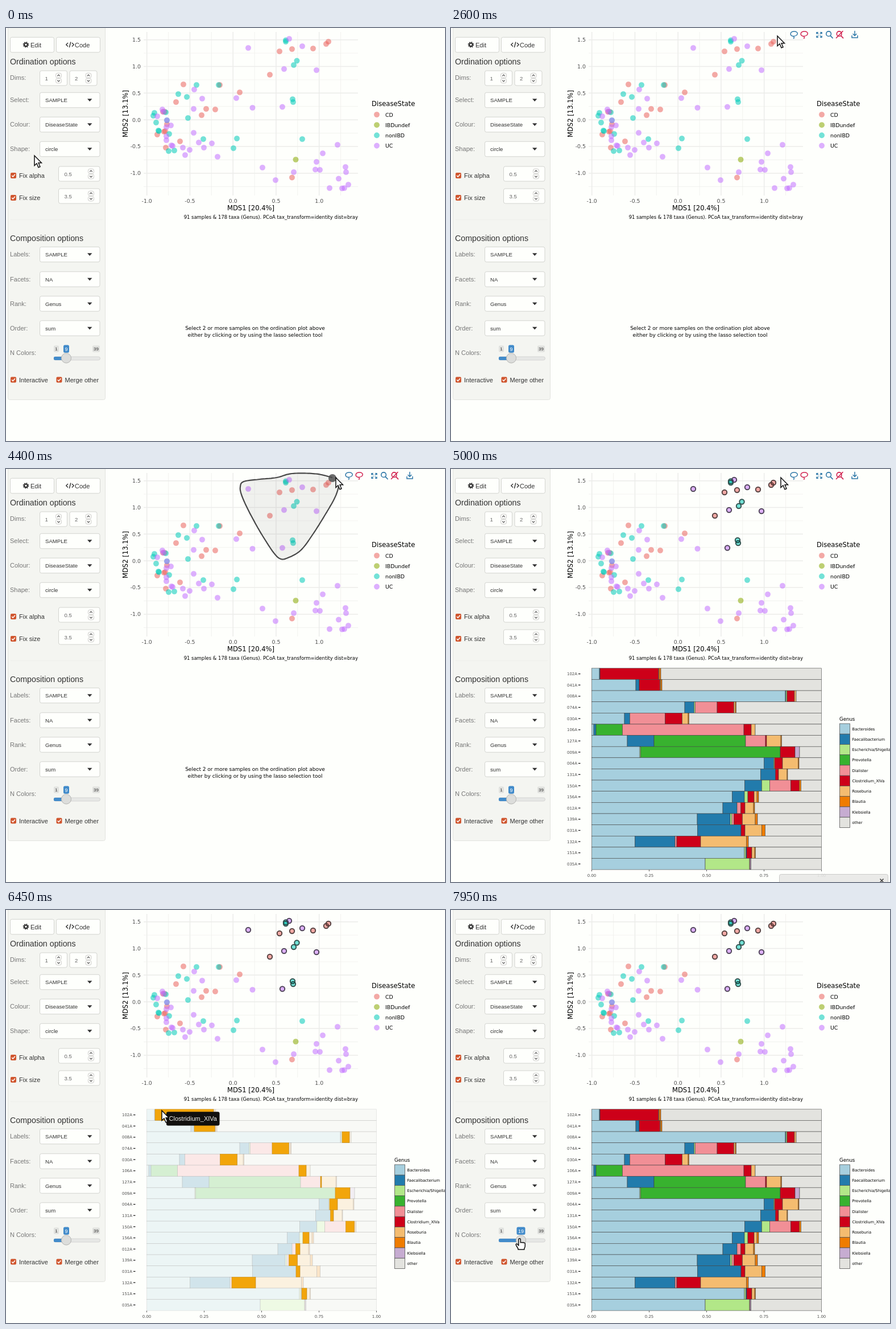
Write an HTML page that moves like this. It is 772x725 px and loops after 8000 ms.

```html
<!DOCTYPE html>
<html lang="en">
<head>
<meta charset="utf-8">
<title>Ordination explorer</title>
<style>
html, body { margin: 0; width: 100%; height: 100%; overflow: hidden; background: #fefffc; }
svg { display: block; width: 100%; height: 100%; }
.ui { font-family: "Liberation Sans", Arial, sans-serif; }
.plot { font-family: "DejaVu Sans", Verdana, sans-serif; }
</style>
</head>
<body>
<script>
const NS = "http://www.w3.org/2000/svg";

function el(tag, attrs, parent, text) {
  const node = document.createElementNS(NS, tag);
  set(node, attrs);
  if (text !== undefined) node.textContent = text;
  if (parent) parent.appendChild(node);
  return node;
}
function set(node, attrs) {
  for (const k in attrs) node.setAttribute(k, attrs[k]);
}
function show(node, on) {
  node.setAttribute("visibility", on ? "visible" : "hidden");
}
const group = (parent, attrs = {}) => el("g", attrs, parent);
const label = (p, x, y, size, fill, str, anchor = "start") =>
  el("text", { x, y, "font-size": size, fill, "text-anchor": anchor }, p, str);
const rect = (p, x, y, width, height, fill, extra) =>
  el("rect", { x, y, width, height, fill, ...extra }, p);
const line = (p, d, stroke, width, extra) =>
  el("path", { d, stroke, fill: "none", "stroke-width": width, ...extra }, p);

const svg = el("svg", { viewBox: "0 0 772 725" }, document.body);

// ---------- sidebar ----------
const side = group(svg, { class: "ui" });
const INK = "#333", MUTED = "#777", SMALL = 9.6, BODY = 11.05;
rect(side, 3.5, -6, 171, 658.5, "#f4f5f1", { rx: 3, stroke: "#e2e3df" });

function field(x, y, w, h = 26.5) {
  rect(side, x, y - h / 2, w, h, "#fefffc", { rx: 3, stroke: "#d3d4d0" });
}
function numberField(x, y, w, value, spin, pad) {
  field(x, y, w, 26);
  label(side, x + pad, y + 3.5, SMALL, "#666", value);
  for (const s of [-1, 1]) {
    const cy = y + s * 4.6;
    rect(side, spin - 5, cy - 4.2, 10, 8.4, "#fafaf8", { rx: 3, stroke: "#c4c4c2", "stroke-width": .8 });
    line(side, `M${spin - 2.2} ${cy - s}l2.2 ${s * 2.2}l2.2 ${-s * 2.2}`, "#555", 1.2);
  }
}
function selectRow(name, y, value) {
  label(side, 7, y + 3.5, BODY, MUTED, name);
  field(59.5, y, 105.5);
  label(side, 69, y + 3.5, SMALL, INK, value);
  el("path", { d: `M143 ${y - 2.2}h8.4l-4.2 4.6z`, fill: INK }, side);
}
function checkbox(x, y, name) {
  rect(side, x - 5, y - 5, 10, 10, "#d0562f", { rx: 2 });
  line(side, `M${x - 2.8} ${y}l2 2.2l3.8 -4.4`, "#fff", 1.5);
  label(side, x + 10, y + 4, BODY, INK, name);
}

field(7.5, 29.5, 77);
field(88.5, 29.5, 77);
label(side, 43, 33.5, BODY, INK, "Edit");
label(side, 121, 33.5, BODY, INK, "Code");
el("circle", { cx: 35, cy: 29.3, r: 2.8, fill: "none", stroke: INK, "stroke-width": 2.2 }, side);
el("circle", { cx: 35, cy: 29.3, r: 4.4, fill: "none", stroke: INK, "stroke-width": 1.8, "stroke-dasharray": "1.73 1.73" }, side);
line(side, "M109 26l-3.2 3.3l3.2 3.3M116 26l3.2 3.3l-3.2 3.3M113.8 24.5l-2.4 9.6", INK, 1.4);

label(side, 7, 63.5, 14.25, INK, "Ordination options");
label(side, 7, 90.5, BODY, MUTED, "Dims:");
numberField(59.5, 88, 48, "1", 92.5, 9);
numberField(112, 88, 48, "2", 145, 9);
selectRow("Select:", 126.5, "SAMPLE");
selectRow("Colour:", 169.5, "DiseaseState");
selectRow("Shape:", 212.5, "circle");
checkbox(13, 259, "Fix alpha");
numberField(92.5, 256, 72.5, "0.5", 149.5, 10);
checkbox(13, 298, "Fix size");
numberField(92.5, 295, 72.5, "3.5", 149.5, 10);
line(side, "M8 336.5H170", "#eeefeb", 1);

label(side, 7, 374, 14.25, INK, "Composition options");
selectRow("Labels:", 397.5, "SAMPLE");
selectRow("Facets:", 441, "NA");
selectRow("Rank:", 484, "Genus");
selectRow("Order:", 527, "sum");
label(side, 7, 574, BODY, MUTED, "N Colors:");
rect(side, 84, 557.5, 9, 11.5, "#e0e1de", { rx: 2 });
label(side, 88.5, 566, 8, INK, "1", "middle");
rect(side, 152, 557.5, 13, 11.5, "#e0e1de", { rx: 2 });
label(side, 158.5, 566, 8, INK, "39", "middle");
rect(side, 84, 577, 81.5, 6, "#e6e7e5", { rx: 3, stroke: "#cfcfcd", "stroke-width": .8 });
const sliderFill = rect(side, 84, 577, 22, 6, "#428bca", { rx: 2 });
const knob = el("circle", { cy: 579.5, r: 8.6, fill: "#dcdddb", stroke: "#b4b4b2", "stroke-width": 1 }, side);
const valueTag = rect(side, 0, 556.5, 10, 13.5, "#428bca", { rx: 2.5 });
const valueText = label(side, 0, 566.5, 9, "#fff", "9", "middle");
checkbox(13, 617.5, "Interactive");
checkbox(93.5, 617.5, "Merge other");

// ---------- ordination plot ----------
const plot = group(svg, { class: "plot" });
const AXIS = "#4d4d4d";
const px = v => 399.2 + v * 151.5;
const py = v => 161.2 - v * 93.7;
for (let v = -1; v <= 1.25; v += .25)
  line(plot, `M${px(v)} 7V294`, "#ececea", v * 2 % 1 ? .7 : 1.5);
for (let v = -1.25; v <= 1.5; v += .25)
  line(plot, `M242 ${py(v)}H619`, "#ececea", v * 2 % 1 ? .7 : 1.5);
for (let v = -1; v <= 1; v += .5) label(plot, px(v), 306.5, 9.4, AXIS, v.toFixed(1), "middle");
for (let v = -1; v <= 1.5; v += .5) label(plot, 237, py(v) + 3.4, 9.4, AXIS, v.toFixed(1), "end");
label(plot, 430.5, 320, 11.6, "#000", "MDS1 [20.4%]", "middle");
set(label(plot, 0, 0, 11.6, "#000", "MDS2 [13.1%]", "middle"), { transform: "translate(213.5 150.5) rotate(-90)" });
label(plot, 619, 334.5, 8.45, "#000", "91 samples & 178 taxa (Genus). PCoA tax_transform=identity dist=bray", "end");

const STATES = [
  ["CD", "#e9625c", [[312,99],[299,130],[352,142],[368,143],[344,153],[376,100],[411,113],[464,82],[481,41],[503,37],
    [540,36],[563,28],[567,24],[306,199],[281,210],[266,187],[278,182],[280,181],[283,169],[276,147],[279,147],[503,262.5]]],
  ["IBDundef", "#86a800", [[509.5,231]]],
  ["nonIBD", "#00cbb8", [[303,116],[318,121],[335,100],[374,100],[320,158],[261,149],[259,154],[281,148],[264,166],[268,180],
    [269,181],[287,186],[286,216],[296,215],[347,195],[400,211],[406,194],[521,195],[504,125],[505,130],[506,65],
    [511.5,57.5],[492,21.5],[492,24],[283,162]]],
  ["UC", "#c170ff", [[331,108],[345,124],[330,142],[275,143],[277,147],[266,155],[283,162],[282,174],[290,171],[282,190],
    [282,197],[291,206],[293,207],[311,210],[323,214],[315,223],[339,201],[348,210],[362,202.5],[330,184],[372,226],
    [405,123],[433.5,140],[426,35],[498,19],[521,32],[489,72],[546,74],[486,138.5],[451,245],[474,267],[506,253],
    [583,205],[557,220],[546,235],[544,248.5],[552,249],[597,244],[598,253],[585,264.5],[602,275],[591,281.5],
    [595,281],[569,281]]]
];
const dots = group(plot);
const rings = group(plot, { fill: "none", stroke: "#1c1c1c", "stroke-width": 2, opacity: .72 });
label(plot, 643, 136.5, 11.6, "#000", "DiseaseState");
STATES.forEach(([name, fill, pts], i) => {
  const dot = (cx, cy) => el("circle", { cx, cy, r: 4.8, fill, "fill-opacity": .55, stroke: fill, "stroke-opacity": .25, "stroke-width": .6 }, dots);
  pts.forEach(([x, y]) => {
    dot(x, y);
    if (x > 415 && y < 139.5) el("circle", { cx: x, cy: y, r: 4.2 }, rings);
  });
  dot(652, 152 + i * 18.2);
  label(plot, 667, 155.5 + i * 18.2, 9.4, "#000", name);
});

const hint = group(plot);
label(hint, 438, 529.5, 9, "#000", "Select 2 or more samples on the ordination plot above", "middle");
label(hint, 438, 542, 9, "#000", "either by clicking or by using the lasso selection tool", "middle");

// ---------- toolbar ----------
const tools = group(svg, { "stroke-linecap": "round" });
const BLUE = "#2f78a8", RED = "#d0204e";
const loop = (x, c) => line(tools, `M${x - 2} 14.4C${x - 8} 13.5 ${x - 8} 6 ${x} 6S${x + 8} 13.8 ${x - 2} 14.4q3 1 1.2 4`, c, 1.5);
const lens = (x, c) => line(tools, `M${x + 2.6} 13.4l4 4.2M${x + 3.9} 10.2a4.3 4.3 0 1 0 -8.6 0a4.3 4.3 0 1 0 8.6 0`, c, 1.6);
loop(603.5, BLUE);
loop(621.5, RED);
for (const sx of [-1, 1]) for (const sy of [-1, 1])
  line(tools, `M${647.5 + sx * 1.6} ${12 + sy * 1.4}l${sx * 3} ${sy * 3}m${-sx * 2.6} 0h${sx * 2.6}v${-sy * 2.6}`, BLUE, 1.3);
lens(664.5, BLUE);
lens(683, RED);
line(tools, "M677.5 17.5L689 5.5", RED, 1.6);
line(tools, "M710 5.5V13M707 10.5l3 3l3 -3M705 13.5V17H715V13.5", BLUE, 1.5);

// ---------- composition bars ----------
const GENERA = {
  B: ["Bacteroides", "#a6cfde"], F: ["Faecalibacterium", "#227bac"], E: ["Escherichia/Shigella", "#b2e788"],
  P: ["Prevotella", "#38b22f"], D: ["Dialister", "#f18f96"], C: ["Clostridium_XIVa", "#cd0019"],
  R: ["Roseburia", "#f4bc70"], L: ["Blautia", "#ef7c00"], K: ["Klebsiella", "#c6acd1"], O: ["other", "#e3e3df"]
};
// right edge of each segment in stage pixels
const BARS = {
  "102A": { B: 261, F: 262, C: 365, R: 366, L: 369 },
  "041A": { B: 325, F: 331, C: 367.5, R: 368.5, L: 371 },
  "008A": { B: 588, F: 589, E: 591, C: 604, R: 607 },
  "074A": { B: 411, F: 427.5, E: 429.5, D: 468, C: 497.5, R: 500, L: 501.5 },
  "030A": { B: 305, F: 314.5, D: 376.5, C: 406.5, R: 417, L: 418.5 },
  "106A": { B: 251, F: 255, P: 301.5, D: 515, C: 528, R: 535 },
  "127A": { B: 310, F: 357, P: 518, D: 553, C: 555, R: 580, L: 581.5 },
  "009A": { B: 332, E: 333.5, P: 579, C: 605, K: 613 },
  "004A": { B: 550.5, F: 567.5, E: 569, C: 583, R: 610.5, L: 612 },
  "131A": { B: 544.5, F: 570.5, C: 576, R: 591, L: 592 },
  "150A": { B: 516.5, F: 546.5, E: 560.5, D: 597.5, C: 612.5, L: 615.5 },
  "156A": { B: 494.5, F: 516, E: 522, C: 533, R: 538, L: 541 },
  "012A": { B: 478, F: 503, D: 509.5, C: 517, R: 532, L: 534 },
  "139A": { B: 433, F: 491, E: 494, D: 497.5, C: 512.5, R: 535, L: 539 },
  "031A": { B: 433.5, F: 510, C: 517, R: 546.5, L: 552.5 },
  "132A": { B: 323.5, F: 394, D: 397, C: 439, R: 519.5, L: 523 },
  "151A": { B: 516, E: 518.5, F: 520, C: 529, R: 534, L: 535.5 },
  "035A": { B: 447, E: 525, D: 526, K: 527.5 }
};
const LEFT = 247.5, RIGHT = 651.5, TOP = 349.8, ROW = 19.63;
const chart = group(svg, { class: "plot" });
const segments = [];
Object.entries(BARS).forEach(([id, ends], i) => {
  const y = TOP + i * ROW;
  let x = LEFT;
  for (const [key, end] of Object.entries({ ...ends, O: RIGHT })) {
    const node = rect(chart, x, y, end - x, ROW, GENERA[key][1], { stroke: "#3c3c3c", "stroke-width": .55 });
    segments.push({ node, key, row: i, x, end });
    x = end;
  }
  label(chart, 222, y + ROW / 2 + 2.6, 6.95, AXIS, id, "end");
  line(chart, `M224 ${y + ROW / 2}h3.5`, "#222", 1.3);
});
for (let i = 0; i <= 4; i++) {
  const x = LEFT + i * (RIGHT - LEFT) / 4;
  line(chart, `M${x} 703.5v2.8`, "#444", .9);
  label(chart, x, 715.5, 6.95, AXIS, (i / 4).toFixed(2), "middle");
}
label(chart, 683, 442, 8.6, "#000", "Genus");
Object.values(GENERA).forEach(([name, fill], i) => {
  const y = 447 + i * 18.25;
  rect(chart, 683.5, y, 18, 18.25, fill, { stroke: "#555", "stroke-width": .8 });
  label(chart, 705.5, y + 11.6, 6.75, "#000", name);
});

// ---------- notice, tooltip, lasso, pointer ----------
const notice = group(svg, { class: "ui" });
rect(notice, 577.5, 711.5, 191, 40, "#e8e8e6", { rx: 3, stroke: "#cbcbc9", "fill-opacity": .9 });
label(notice, 597, 732.5, BODY, INK, "Drawing bars");
line(notice, "M754.5 719.5l6 6m0 -6l-6 6", "#444", 1.6);

const lassoLayer = group(svg);
const lassoPath = line(lassoLayer, "", "#474747", 2.2, { "stroke-linejoin": "round" });
set(lassoPath, { fill: "#000", "fill-opacity": .055 });
el("circle", { cx: 574, cy: 16, r: 7, fill: "#4a4a4a", opacity: .82 }, lassoLayer);

const tip = group(svg, { class: "ui" });
const tipBox = rect(tip, 0, 0, 10, 24.3, "#11100e", { rx: 3 });
const tipText = label(tip, 4.5, 16.2, BODY, "#f4f4f0", "");

const arrow = el("path", { d: "M0 0V17.5L4 13.8L7 20.8L10 19.5L7.1 12.8H12.5Z", fill: "#fff", stroke: "#111", "stroke-width": 1.5 }, svg);
const hand = el("path", {
  d: "M-1.6 1.5a1.7 1.7 0 0 1 3.4 0V7q1.6 -1.2 3 0q1.6 -1 2.8 .3q1.8 -.6 2.2 1.2V13q0 2 -1.4 4V19H-2.5v-1.5L-6 11.5q-1 -2 .8 -2.4q1.4 0 3.6 3z",
  fill: "#fff", stroke: "#111", "stroke-width": 1.5, "stroke-linejoin": "round"
}, svg);

// ---------- timing ----------
const LOOP = 8000, STEP = 50;
const MOVES = [[50,50,224],[400,68,317],[950,68,317],[1500,560,8],[1800,560,8],[2200,597,23],[2300,597,23],[2450,562,25],
  [2600,574,14],[2700,574,14],[4400,580,15],[5150,580,15],[5800,481,395],[6000,470,398],[6450,274,352],[6650,248,338],
  [6850,225,336],[7650,104,577],[7700,104,577],[7950,120.5,577]];
const LASSO = [[2700,574,15],[2900,545,8.5],[3050,503,8],[3170,476,15],[3260,446,18],[3330,418,22],[3380,412,31],[3420,414,45],
  [3480,425,70],[3550,441,100],[3650,456,125],[3750,470,146],[3850,481,157],[3950,493,157],[4030,518,143],[4110,540,114],
  [4200,562,79],[4280,577,53],[4340,584,35],[4370,584.5,25],[4400,580,15]];
const FADE = [[1300,0],[1500,1],[5500,1],[5900,0],[6550,0],[6800,.8],[6900,.8],[7300,0]];

const ease = u => u * u * (3 - 2 * u);

// value of a [time, ...numbers] track at t
function track(keys, t, curve = u => u) {
  if (t <= keys[0][0]) return keys[0].slice(1);
  const i = keys.findIndex(k => k[0] > t);
  if (i < 0) return keys[keys.length - 1].slice(1);
  const a = keys[i - 1], b = keys[i], u = curve((t - a[0]) / (b[0] - a[0]));
  return a.slice(1).map((v, j) => v + (b[j + 1] - v) * u);
}
function spline(keys, t) {
  let i = keys.findIndex(k => k[0] > t) - 1;
  if (i < 0) i = keys.length - 2;
  const at = n => keys[Math.max(0, Math.min(keys.length - 1, n))];
  const [p, a, b, n] = [at(i - 1), at(i), at(i + 1), at(i + 2)];
  const u = Math.min(1, (t - a[0]) / (b[0] - a[0]));
  return [1, 2].map(k => a[k] + .5 * u * (b[k] - p[k] +
    u * (2 * p[k] - 5 * a[k] + 4 * b[k] - n[k] + u * (3 * (a[k] - b[k]) + n[k] - p[k]))));
}

let lit = null;
function highlight(key) {
  if (key === lit) return;
  lit = key;
  for (const s of segments) {
    const on = s.key === key;
    set(s.node, {
      fill: on ? "#f2a50a" : GENERA[s.key][1],
      stroke: on ? "#c08a20" : "#3c3c3c",
      opacity: key && !on ? .2 : 1
    });
  }
  if (key) {
    tipText.textContent = GENERA[key][0];
    set(tipBox, { width: tipText.getComputedTextLength() + 9 });
  }
}

function render(t) {
  const drawing = t > 2700 && t < 4550;
  const charted = t >= 4850;
  const [x, y] = t > 2700 && t < 4400 ? spline(LASSO, t) : track(MOVES, t, ease);
  const onKnob = t >= 7600;
  set(arrow, { transform: `translate(${x} ${y})` });
  set(hand, { transform: `translate(${x} ${y})` });
  show(arrow, !onKnob);
  show(hand, onKnob);

  show(lassoLayer, drawing);
  if (drawing) {
    const pts = [];
    for (let s = 2700; s <= Math.min(t, 4400); s += 10) pts.push(spline(LASSO, s).map(v => v.toFixed(1)).join(" "));
    set(lassoPath, { d: "M" + pts.join("L") });
  }
  show(hint, t < 4550);
  show(rings, t >= 4550);
  show(chart, charted);
  set(tools, { opacity: track(FADE, t)[0] });
  set(notice, { opacity: track([[4700, 0], [4900, 1], [5350, 1], [5550, 0]], t)[0] });

  const row = Math.floor((y - TOP) / ROW);
  const hit = charted && segments.find(s => s.row === row && x >= s.x && x < s.end);
  highlight(hit ? hit.key : null);
  show(tip, !!hit);
  set(tip, { transform: `translate(${x + 8} ${y + 2.3})` });

  const count = Math.round(track([[7700, 9], [7950, 19]], t, ease)[0]);
  const kx = 106 + (count - 9) * 1.7, w = count > 9 ? 15 : 10;
  set(knob, { cx: kx });
  set(sliderFill, { width: kx - 84 });
  set(valueTag, { x: kx - w / 2, width: w });
  set(valueText, { x: kx });
  valueText.textContent = count;
}

const start = performance.now();
function tick() {
  const t = (performance.now() - start) % LOOP;
  render(Math.floor(t / STEP) * STEP);
  requestAnimationFrame(tick);
}
tick();
</script>
</body>
</html>
```
